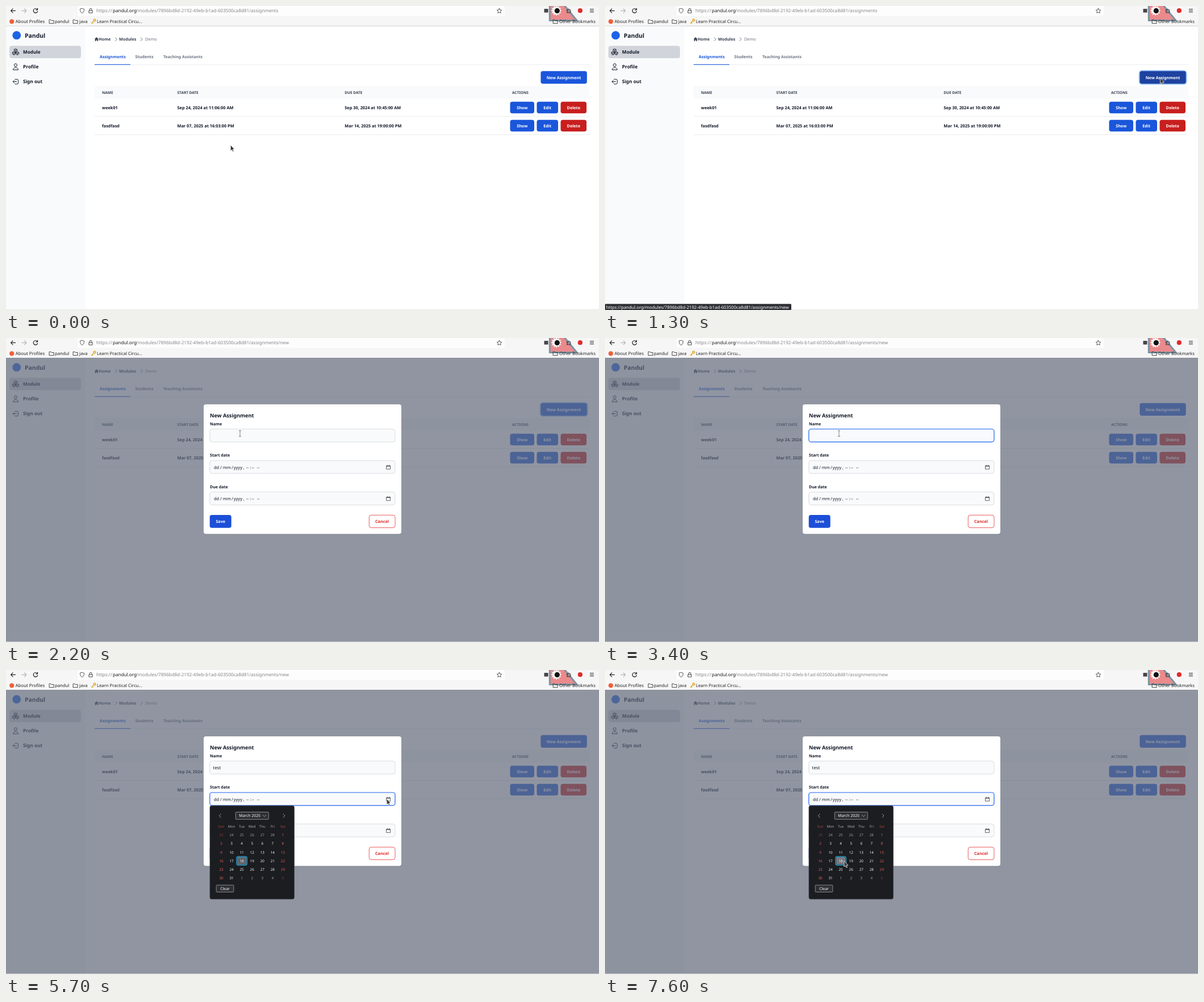
Recreate the animation shown at these times as an HTML page. Size 1044x536 px, loop 8000 ms.

```html
<!DOCTYPE html>
<html lang="en">
<head>
<meta charset="utf-8">
<title>New assignment</title>
<style>
  html, body { margin: 0; width: 100%; height: 100%; overflow: hidden; background: #fff; }
  svg { display: block; font-family: "Noto Sans", "Open Sans", sans-serif; text-rendering: geometricPrecision; }
  text { white-space: pre; }
</style>
</head>
<body>
<svg id="stage" width="1044" height="536" viewBox="0 0 1044 536"></svg>
<script>
const INK = '#111827', BLUE = '#1a56db', RED = '#c81e1e', LINE = '#e5e7eb';

// y is the middle of the capitals
const text = (x, y, size, str, fill = INK, weight = 400, more = '') =>
  `<text x="${x}" y="${y + size * .357}" font-size="${size}" fill="${fill}" font-weight="${weight}" ${more}>${str}</text>`;
const centred = (x, y, size, str, fill, weight, more = '') =>
  text(x, y, size, str, fill, weight, `text-anchor="middle" ${more}`);
const rect = (x, y, w, h, fill, r = 0, more = '') =>
  `<rect x="${x}" y="${y}" width="${w}" height="${h}" rx="${r}" fill="${fill}" ${more}/>`;
const dot = (x, y, r, fill) => `<circle cx="${x}" cy="${y}" r="${r}" fill="${fill}"/>`;
const line = (d, color = '#333', width = 1, more = '') =>
  `<path d="${d}" fill="none" stroke="${color}" stroke-width="${width}" stroke-linecap="round" stroke-linejoin="round" ${more}/>`;
const button = (x, y, w, h, label, fill, more = '') =>
  rect(x, y, w, h, fill, 3.8, more) + centred(x + w / 2, y + h / 2 + .2, 7.2, label, '#fff', 600);
const folder = x => line(`M${x} 24.3h2.6l1 1.2h4v5.2h-7.6z`, '#333', .9);

const SITE = 'pandul.org';
const PAGE = '/modules/7896bd8d-2192-49eb-b1ad-603500ca8d81/assignments';

function toolbar() {
  const burst = Array.from({ length: 24 }, (_, i) => {
    const a = i * Math.PI / 12, r = i % 2 ? 6.5 : 9.5;
    return `${969 + r * Math.cos(a)},${8 + r * Math.sin(a)}`;
  }).join(' ');
  return rect(0, 0, 1044, 35, '#f6f6f7') + rect(126, 0, 752, 17.5, '#fdfdfd', 2) +
    `<path d="M957.3 -3H981.5L1005 25.6H957.3z" fill="#ea8a8c" stroke="#7d93a1" stroke-width="3"/>` +
    `<polygon points="${burst}" fill="#fff"/>` +
    line('M16.5 8.3H8.5M12 4.8L8.5 8.3L12 11.8', '#222', 1.2) +
    line('M28 8.3H36M32.5 4.8L36 8.3L32.5 11.8', '#b4b4b8', 1.2) +
    line('M55 6A3.8 3.8 0 1 0 55.6 9.5M55.6 4v2.8h-2.8', '#222', 1.2) +
    line('M134 4.3L137.5 5.5C137.6 9 136.5 11.2 134 12.6C131.5 11.2 130.4 9 130.5 5.5z', '#555') +
    line('M146.3 8h5.8v4.2h-5.8zM147.3 8V6.2a1.9 1.9 0 0 1 3.8 0V8', '#444') +
    text(159, 8.6, 8.1, 'https://', '#85858b') + text(188, 8.6, 8.1, SITE, '#18181b') +
    text(229, 8.6, 8.1, PAGE + '<tspan id="suffix"></tspan>', '#85858b') +
    line('M868.5 4.2l1.3 2.7 3 .4-2.2 2.1.5 3-2.6-1.4-2.6 1.4.5-3-2.2-2.1 3-.4z', '#444', .9) +
    rect(947.5, 5, 7, 6.5, '#45454a') + dot(970.3, 8.4, 4.6, '#111') +
    line('M987.5 6.8h2a1.2 1.2 0 1 1 2.3 0h2v5h-6.3v-1.6a1.1 1.1 0 1 0 0-2z', '#333') +
    dot(1010.8, 8.2, 4.1, '#e02b2b') +
    line('M1028.3 5.6h6.2M1028.3 8.2h6.2M1028.3 10.8h6.2', '#333') +
    dot(10.2, 27.4, 4.2, '#f0603a') + text(16.7, 27.4, 7.8, 'About Profiles', '#222') +
    folder(76.5) + text(86, 27.4, 7.7, 'pandul', '#222') +
    folder(118.5) + text(129, 27.4, 7.7, 'java', '#222') +
    `<circle cx="156" cy="25" r="1.8" fill="none" stroke="#e3a51f" stroke-width="1.4"/>` +
    line('M154.6 26.4L150.5 30.5M152 29l1.2 1.2', '#e3a51f', 1.3) +
    text(160, 27.4, 7.7, 'Learn Practical Circu…', '#222') +
    folder(963.5) + text(974, 27.4, 7.7, 'Other Bookmarks', '#222') +
    rect(0, 34.8, 1044, .9, '#c9c9cc');
}

function page() {
  const row = (y, name, start, due) =>
    text(169, y, 7.3, name, INK, 600) + text(301.5, y, 7.35, start, INK, 600) + text(596.3, y, 7.35, due, INK, 600) +
    button(887.5, y - 10.5, 42.5, 20.6, 'Show', BLUE) + button(934.5, y - 10.5, 37.5, 20.6, 'Edit', BLUE) +
    button(976.5, y - 10.5, 45.5, 20.6, 'Delete', RED) + rect(156, y + 15.2, 871, .8, LINE);
  const cube = (x, y) => line(`M${x} ${y - 2.9}l2.6 1.4v2.9l-2.6 1.4l-2.6-1.4v-2.9zM${x - 2.6} ${y - 1.5}l2.6 1.3l2.6-1.3M${x} ${y - .2}v3`, INK, .85);
  const head = [[169, 'NAME'], [301.5, 'START DATE'], [596.3, 'DUE DATE'], [891, 'ACTIONS']];
  return rect(0, 35.7, 139.5, 500, '#f9fafb') +
    dot(18.7, 51.7, 7.4, '#1d63e8') + text(33, 52.2, 10.4, 'Pandul', INK, 600) +
    rect(6, 70.2, 126, 21.8, '#d1d5db', 4) +
    cube(17, 78.3) + cube(14, 83.4) + cube(20, 83.4) + text(30, 81.3, 8.2, 'Module', INK, 600) +
    `<circle cx="17" cy="104.2" r="2.5" fill="none" stroke="${INK}"/>` +
    line('M12.5 112.2c0-5 9-5 9 0z', INK) + text(30, 107.3, 8.4, 'Profile', INK, 600) +
    line('M16 129.2h3.5a2 2 0 0 1 2 2v4.4a2 2 0 0 1-2 2H16M18.6 133.4h-6.4M14.6 131l-2.4 2.4l2.4 2.4', INK) +
    text(30, 133.4, 8.3, 'Sign out', INK, 600) +
    `<path d="M155.8 58.6L159.4 55L163 58.6H162V62H160.2V59.8H158.6V62H156.8V58.6z" fill="#374151"/>` +
    text(163, 58.7, 7.2, 'Home', '#374151', 600) + line('M192.5 55.8l2.7 2.8l-2.7 2.8', '#6b7280') +
    text(199, 58.7, 7.15, 'Modules', '#374151', 600) + line('M237.3 55.8l2.7 2.8l-2.7 2.8', '#6b7280') +
    text(245, 58.7, 7.3, 'Demo', '#6b7280', 500) +
    text(165, 89.4, 7.1, 'Assignments', BLUE, 600) + text(227.5, 89.4, 7.2, 'Students', '#6b7280', 600) +
    text(277, 89.4, 7, 'Teaching Assistants', '#6b7280', 600) +
    rect(156, 103, 871, .7, LINE) + rect(156, 102.7, 63, 1.1, BLUE) +
    rect(940.7, 114.1, 83, 23.8, 'none', 4.8, 'id="ring" stroke="#a4cafe" stroke-width="2.2"') +
    button(941.4, 114.8, 81.4, 22.2, 'New Assignment', BLUE, 'id="create"') +
    rect(156, 141, 871, 22.3, '#f9fafb') +
    head.map(([x, s]) => text(x, 152.3, 6.5, s, '#374151', 700)).join('') +
    row(179.2, 'week01', 'Sep 24, 2024 at 11:06:00 AM', 'Sep 30, 2024 at 10:45:00 AM') +
    row(211.2, 'fasdfasd', 'Mar 07, 2025 at 16:03:00 PM', 'Mar 14, 2025 at 19:00:00 PM') +
    rect(0, 535, 1044, 1, '#e3e4e7');
}

function modal() {
  const field = (id, y, label) => text(359, y - 9.1, 7.05, label, INK, 600) +
    rect(358.8, y, 326.2, 22.8, '#f9fafb', 4, `id="${id}" stroke="#d1d5db" stroke-width=".8"`);
  const parts = [[366, 'dd'], [377, '/'], [381.7, 'mm'], [397, '/'], [400.7, 'yyyy'], [417.5, ','],
    [422.7, '--'], [429.3, ':'], [432.2, '--'], [441.8, '--']];
  const date = y => parts.map(([x, s]) => text(x, y, 7.5, s)).join('') +
    line(`M670 ${y - 2.8}h6.6v6h-6.6zM670 ${y - 1.8}h6.6M671.5 ${y - 3.8}v1M675 ${y - 3.8}v1`, '#333', .75);
  return rect(0, 35, 1044, 500.4, '#62697a', 0, 'opacity=".7"') +
    rect(348, 118, 348, 228.4, '#000', 4, 'opacity=".12"') + rect(348, 117, 348, 228.6, '#fff', 4) +
    text(359, 136.9, 9.2, 'New Assignment', INK, 600) +
    field('name', 160.5, 'Name') + text(364.6, 172.6, 7.8, '', INK, 400, 'id="typed"') +
    field('start', 216, 'Start date') + date(228) +
    field('due', 271.5, 'Due date') + date(283.4) +
    button(358.7, 311.9, 38, 22.9, 'Save', '#1c4fd8') +
    rect(639.3, 312.3, 45.7, 22.2, '#fff', 3.8, 'stroke="#e02424" stroke-width=".75"') +
    centred(662, 323.6, 7.25, 'Cancel', '#e02424', 600);
}

const cellX = i => 379 + i % 7 * 18.07, cellY = i => 290.7 + Math.floor(i / 7) * 15.22;

function picker() {
  const days = Array.from({ length: 42 }, (_, i) => {
    const n = i - 5, inside = n > 0 && n < 32, weekend = i % 7 % 6 === 0;
    const day = n < 1 ? n + 28 : n > 31 ? n - 31 : n;
    const fill = weekend ? (inside ? '#e8615c' : '#8e3c3b') : inside ? '#f4f4f5' : '#a0a0a6';
    return centred(cellX(i), cellY(i) + .2, 6.3, day, fill, inside ? 500 : 400);
  });
  const week = ['Sun', 'Mon', 'Tue', 'Wed', 'Thu', 'Fri', 'Sat'].map((s, i) =>
    centred(cellX(i), 275.4, 6.1, s, i % 6 ? '#a9a9af' : '#a84340'));
  return rect(359, 239.3, 148.4, 164.6, '#1b1d20', 3, 'stroke="#3a3c42" stroke-width=".8"') +
    line('M378.3 253.8l-3 3.2l3 3.2M488 253.8l3 3.2l-3 3.2', '#bbb', .8) +
    rect(404.3, 250.5, 58, 12.8, '#2d2f34', 1, 'stroke="#a5a5ad" stroke-width=".8"') +
    text(410.3, 257, 6.85, 'March 2025', '#fff') + line('M452.2 255.7l2.8 2.8l2.8-2.8', '#bbb', .8) +
    week.join('') +
    rect(0, 0, 16.6, 13.8, '#4a4c52', 2, 'id="hover"') +
    rect(406, 328.8, 18.3, 15.3, '#1b1d20', 3, 'stroke="#1fb6ee" stroke-width="1.2"') +
    rect(407.9, 330.6, 14.5, 11.7, '#5d5f66', 1, 'id="today" stroke="#b8b8be" stroke-width=".6"') +
    days.join('') +
    rect(370.2, 379.2, 30.6, 12.3, '#2d2f34', 1, 'stroke="#a5a5ad" stroke-width=".8"') +
    centred(385.5, 385.4, 6.9, 'Clear', '#fff');
}

const status = rect(0, 525.3, 328, 10.7, '#2f3036', 1.5) +
  text(1.7, 531.2, 7.7, `https://${SITE}${PAGE}/new`, '#fff');

document.getElementById('stage').innerHTML = toolbar() + page() +
  `<g id="modal">${modal()}</g><g id="status">${status}</g><g id="picker">${picker()}</g>` +
  `<path id="arrow" d="M0 0V10.4L2.3 8.4L3.9 12L5.6 11.2L4 7.8H7z" fill="#36373b" stroke="#fff" stroke-width=".7"/>` +
  `<g id="beam">${line('M-1.8 -5H1.8M0 -5V5M-1.8 5H1.8', '#666', .8)}</g>`;

const el = Object.fromEntries([...document.querySelectorAll('[id]')].map(e => [e.id, e]));
const show = (e, on) => e.setAttribute('opacity', +on);
const place = (e, x, y) => e.setAttribute('transform', `translate(${x} ${y})`);
const focus = (e, on) => {
  e.setAttribute('stroke', on ? '#1c64f2' : '#d1d5db');
  e.setAttribute('stroke-width', on ? 1.2 : .8);
};

// pointer path: time, x, y
const path = [
  [100, 395.3, 245], [200, 410, 256], [300, 465, 270], [400, 560, 270], [500, 675, 248], [700, 865, 182],
  [900, 965, 134], [1000, 977.5, 126.5], [1600, 977.5, 126.5], [1700, 955, 130], [2000, 560, 156],
  [2200, 412, 168.3], [4400, 412, 168.3], [4500, 440, 177], [4800, 645, 235], [4900, 669.5, 241],
  [5300, 670.3, 227], [5800, 670.3, 227], [6000, 640, 250], [6400, 480, 345], [6500, 452, 355],
  [6700, 433, 336], [6800, 423, 337], [7100, 418, 335], [7300, 421, 336.5], [7400, 421, 336.5],
  [7500, 427, 336.5], [7600, 421, 336.5]
];

function pointerAt(t) {
  const i = path.findIndex(p => p[0] > t);
  if (i < 1) return path.at(i).slice(1);
  const [t0, x0, y0] = path[i - 1], [t1, x1, y1] = path[i], k = (t - t0) / (t1 - t0);
  return [x0 + (x1 - x0) * k, y0 + (y1 - y0) * k];
}

function draw(t) {
  const [x, y] = pointerAt(t);
  const open = t >= 1400, typing = t >= 3500 && t < 4500, calendar = t >= 5600;
  const overName = open && x > 359 && x < 685 && y > 161 && y < 183;

  el.suffix.textContent = open ? '/new' : '';
  show(el.modal, open);
  show(el.ring, t >= 1200 && t < 2300);
  el.create.setAttribute('fill', !open && x > 941 && y < 137 ? '#1e429f' : BLUE);
  show(el.status, t < 1100 || t >= 1500 ? 0 : open ? .55 : 1);

  focus(el.name, t >= 2300 && t < 5400);
  focus(el.start, t >= 5400);
  el.typed.textContent = 'test'.slice(0, t < 3500 ? 0 : t < 3700 ? 2 : t < 4000 ? 3 : 4);

  show(el.picker, !calendar ? 0 : t < 5700 ? .6 : 1);
  const col = Math.round((x - 379) / 18.07), row = Math.round((y - 290.7) / 15.22);
  const cell = row * 7 + col, onGrid = col >= 0 && col < 7 && row >= 0 && row < 6;
  show(el.hover, calendar && onGrid);
  if (onGrid) place(el.hover, cellX(cell) - 8.3, cellY(cell) - 6.9);
  el.today.setAttribute('fill', onGrid && cell === 23 ? '#74767d' : '#5d5f66');

  show(el.arrow, !overName && !typing);
  show(el.beam, overName && !typing);
  place(el.arrow, x, y);
  place(el.beam, x, y);
}

function tick() {
  draw(Math.floor(performance.now() % 8000 / 100) * 100);
  requestAnimationFrame(tick);
}
tick();
</script>
</body>
</html>
```
